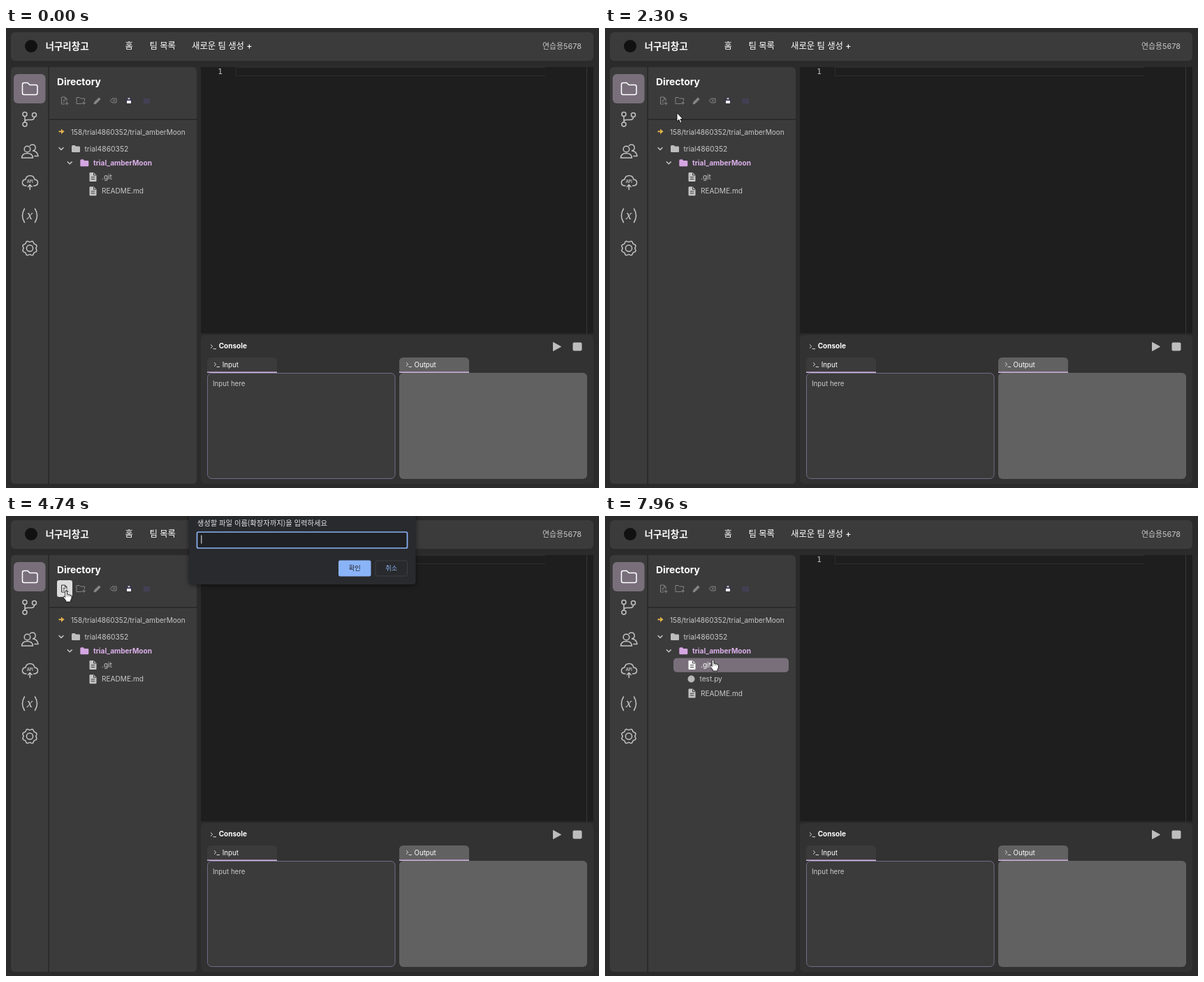
Recreate the animation shown at these times as an HTML page. Size 849 by 659 pixels, loop 8 s.

```html
<!DOCTYPE html>
<html lang="ko">
<head>
<meta charset="utf-8">
<style>
html, body { margin: 0; width: 100%; height: 100%; overflow: hidden; background: #2b2b2b; }
svg { display: block; width: 849px; height: 659px; font: 10.1px Inter, "Noto Sans CJK KR", "Noto Sans CJK", sans-serif; }
text { fill: #fff; white-space: pre; }
.nav { font-size: 12.4px; font-weight: 500; }
.tree text { fill: #c8c8c8; }
.tree .on text { fill: #fff; }
.tree .on use { color: #fff; }
.line { fill: none; stroke: #c4c4c4; stroke-width: 1.5; stroke-linecap: round; stroke-linejoin: round; }
.tool { fill: none; stroke: #858585; stroke-width: 1; stroke-linejoin: round; }
#dialog { font-family: "Noto Sans CJK KR", "Noto Sans CJK", sans-serif; filter: drop-shadow(0 1px 3px #0008); }
</style>
</head>
<body>
<svg viewBox="0 0 849 659">
  <defs>
    <path id="folder" fill="currentColor" d="M0 1.5Q0 0 1.5 0H4.5L6 1.6H10.7Q12 1.6 12 3V8.7Q12 10 10.7 10H1.3Q0 10 0 8.7Z"/>
    <g id="file">
      <path fill="currentColor" d="M0 1.2Q0 0 1.2 0H6L10 4V11.8Q10 13 8.8 13H1.2Q0 13 0 11.8Z"/>
      <path d="M6 .5V4H9.6M2.3 6.7H7.7M2.3 9.5H7.7" fill="none" stroke="#3b3b3b"/>
    </g>
    <path id="chevron" class="line" stroke-width="1.2" d="M-3-1.5 0 1.5 3-1.5"/>
    <path id="prompt" fill="none" stroke="#ddd" d="M0 0 2.7 2.6 0 5.2M3.6 6.2H8"/>
  </defs>

  <g fill="#3b3b3b">
    <rect x="7" y="6" width="834" height="41" rx="6"/>
    <path d="M13 56H60V653H13Q7 653 7 647V62Q7 56 13 56Z"/>
    <path d="M62 56H267Q273 56 273 62V130H62Z"/>
    <path d="M62 132H273V647Q273 653 267 653H62Z"/>
  </g>

  <circle cx="36" cy="26" r="9" fill="#111"/>
  <text x="56.5" y="30.5" font-size="13.5" font-weight="700">너구리창고</text>
  <g class="nav">
    <text x="170.5" y="30.3">홈</text>
    <text x="205.5" y="30.3">팀 목록</text>
    <text x="266" y="30.3">새로운 팀 생성 +</text>
  </g>
  <text x="824" y="30.3" font-size="10.9" text-anchor="end" style="fill:#c8c8c8">연습용5678</text>

  <!-- side bar -->
  <rect x="11" y="66" width="45.500" height="42" rx="6" fill="#796f7b"/>
  <g class="line">
    <path stroke="#fff" d="M23.500 81Q23.500 78.500 26 78.500H31L34 81.500H42.500Q45 81.500 45 84V93Q45 95.500 42.500 95.500H26Q23.500 95.500 23.500 93Z"/>
    <circle cx="27" cy="123.500" r="3"/><circle cx="27" cy="138" r="3"/><circle cx="40.500" cy="124.500" r="3"/>
    <path d="M27 126.500V135M40.500 127.500Q40.500 131.500 36 131.500H31Q27 131.500 27 134.500"/>
    <circle cx="30.500" cy="173.500" r="4.300"/>
    <path d="M22.500 186Q23 179.500 30.500 179.500T38.500 186ZM34.500 168.500A4.500 4.500 0 1 1 38.500 176Q45 176.500 46 183.500H41"/>
    <path d="M29 226H27.500Q23.500 225.500 23.500 221.500T28 217Q29 211.500 34.500 211.500T41 217Q45.500 217.500 45.500 221.500T41 226H39.500M34.300 231.500V225M31.500 227.500 34.300 224.500 37.100 227.500"/>
    <path d="M26.500 259Q20.500 268.500 26.500 278.500M41.500 259Q47.500 268.500 41.500 278.500"/>
    <circle cx="34" cy="315.500" r="4.600"/>
    <path id="gear"/>
  </g>
  <text x="34.300" y="222" text-anchor="middle" font-size="5.500" font-weight="700" style="fill:#c4c4c4">API</text>
  <text x="34" y="273.500" text-anchor="middle" font-size="17" font-style="italic" font-family="Noto Serif, serif" style="fill:#c4c4c4">x</text>

  <!-- directory -->
  <text x="73" y="82" font-size="13.800" font-weight="700">Directory</text>
  <rect id="newHover" x="73" y="92" width="22" height="24" rx="3" fill="#dcdcdc"/>
  <g class="tool">
    <path id="newIcon" d="M84 109H79.500V99H84.500L87 101.500V104.500M84.500 99V101.500H87M81.500 103.500H85M81.500 106H84M87 105.500V110.500M84.500 108H89.500"/>
    <path d="M109 108.500H101V99.500H105L106.500 101H112.500V104.500M111.500 105V110M109 107.500H114"/>
    <path fill="#858585" d="M126 109 126.800 106 133 99.800 135.200 102 129 108.200Z"/>
    <path d="M152 101H158V107H152L149.300 104ZM153 102.500 156 105.500M156 102.500 153 105.500"/>
  </g>
  <path d="M172 100H179L180 101V108H172Z" fill="#33334d"/>
  <path d="M174.500 100H177.500V102.500H174.500Z" fill="#b5b5c0"/>
  <path d="M173 104H179V108H173Z" fill="#eee"/>
  <path d="M196.500 101H206V108.500H196.500Z" fill="#434055"/>

  <g class="tree">
    <rect id="rowHover" rx="5"/>
    <path d="M75.500 147.200H79V144.500L83.500 148.200 79 152V149.200H75.500Z" fill="#e2b04a"/>
    <text x="93" y="153" font-size="10">158/trial4860352/trial_amberMoon</text>
    <use href="#chevron" x="79" y="173"/>
    <use href="#folder" x="94" y="168" color="#bdbdbd"/>
    <text x="112.500" y="176.700" font-size="10.300">trial4860352</text>
    <use href="#chevron" x="91.300" y="193.300"/>
    <use href="#folder" x="106.300" y="188.300" color="#d5a6e2"/>
    <text x="125" y="196.800" font-weight="700" style="fill:#dcb0ea">trial_amberMoon</text>
    <g id="git">
      <use href="#file" x="119.500" y="207" color="#c4c4c4"/>
      <text x="137" y="217">.git</text>
    </g>
    <g id="newFile">
      <circle cx="123.500" cy="233.500" r="5" fill="#b8b8b8"/>
      <text x="135.500" y="237.300">test.py</text>
    </g>
    <g id="readme">
      <use href="#file" x="119.500" y="227.300" color="#c4c4c4"/>
      <text x="137" y="237.300">README.md</text>
    </g>
  </g>

  <!-- editor -->
  <path d="M279 56H841V437.500H279Z" fill="#1e1e1e"/>
  <path d="M772 56.500H329.500V68.500H772" fill="none" stroke="#2d2d2d"/>
  <path d="M831.500 56V437.500" stroke="#383838"/>
  <text x="303.300" y="66" font-size="11" font-family="DejaVu Sans Mono, monospace" style="fill:#c6c6c6">1</text>

  <!-- console -->
  <rect x="279" y="440" width="562" height="213" rx="6" fill="#323232"/>
  <use href="#prompt" x="293" y="453.500"/>
  <text x="304.700" y="459.300" font-size="10" font-weight="700">Console</text>
  <path d="M783.500 450.500 794.500 456.500 783.500 462.500Z" fill="#bdbdbd" stroke="#bdbdbd" stroke-linejoin="round"/>
  <rect x="811.500" y="450.500" width="13" height="12" rx="2" fill="#bdbdbd"/>
  <path d="M288 494V478Q288 472 294 472H382Q388 472 388 478V494Z" fill="#3b3b3b"/>
  <path d="M563 494V478Q563 472 569 472H657Q663 472 663 478V494Z" fill="#616161"/>
  <rect x="288.500" y="494.500" width="268.500" height="151" rx="6" fill="#3b3b3b" stroke="#746b87"/>
  <rect x="563" y="494" width="269" height="152" rx="6" fill="#616161"/>
  <path d="M288 493.300H388M563 493.300H663" stroke="#cfb5e2" stroke-width="1.600"/>
  <use href="#prompt" x="298" y="479.300"/>
  <text x="309.700" y="485.500" font-size="9.700">Input</text>
  <use href="#prompt" x="573" y="479.300"/>
  <text x="584.500" y="485.500" font-size="9.700">Output</text>
  <text x="296" y="513" font-size="9.700" style="fill:#c8c8c8">Input here</text>

  <g id="dialog">
    <rect x="262" y="-8" width="324.500" height="107.500" rx="4" fill="#292a2d"/>
    <text x="273.800" y="15" font-size="10.300" style="fill:#e4e5e7">생성할 파일 이름(확장자까지)을 입력하세요</text>
    <rect x="273.500" y="24.500" width="301" height="23" rx="2" fill="#202124" stroke="#8ab4f8" stroke-width="1.700"/>
    <text id="typed" x="279.300" y="39" font-size="8.700" font-family="Open Sans, sans-serif"/>
    <rect id="caret" y="29" width="1" height="12" fill="#eee"/>
    <rect x="476" y="65" width="46.500" height="23" rx="2.500" fill="#8ab4f8"/>
    <text x="499.200" y="79.800" font-size="9.300" text-anchor="middle" style="fill:#202124">확인</text>
    <rect x="529" y="65.500" width="45.500" height="22" rx="2.500" fill="none" stroke="#3c4043"/>
    <text x="551.700" y="79.800" font-size="9.300" text-anchor="middle" style="fill:#8ab4f8">취소</text>
  </g>

  <g id="pointer" fill="#fff" stroke="#000" stroke-width=".8" stroke-linejoin="round">
    <path id="arrow" d="M0 0V12.300L2.900 9.700 5 14.700 7 13.800 4.900 9H8.600Z"/>
    <g id="hand">
      <path d="M-1.300 1Q0-.8 1.400 1V5.300Q2.800 4.500 3.800 5.900 5.200 5.200 6 6.500 7.700 6 8 7.800V11L6.500 14V16H-.2V14.300L-3.800 9.800Q-4.200 7.800-2.600 8.100L-1.300 9.500Z"/>
      <path d="M1.400 5.500V8.500M3.800 6V8.500M6 6.600V8.500" stroke-width=".5"/>
    </g>
  </g>
</svg>

<script>
const LOOP = 8000;
const $ = id => document.getElementById(id);

// Pointer moves: start, end, number of steps, x, y
const moves = [
  [80, 250, 3, 141, 247],
  [510, 870, 5, 140, 195],
  [1050, 1050, 1, 133, 182.5],
  [1140, 1230, 2, 128, 170],
  [1320, 1400, 2, 134, 190],
  [1580, 1750, 3, 860, 670],
  [2030, 2030, 1, 188, 225],
  [2120, 2300, 3, 103, 121.5],
  [2390, 2750, 5, 84, 105],
  [3020, 3020, 1, 190, 232],
  [3110, 3110, 1, 296.5, 236],
  [3200, 3290, 2, 328, 232],
  [3740, 4470, 9, 86, 107],
  [5000, 5180, 3, 168, 87],
  [7780, 7960, 3, 154.5, 206],
];

// Highlighted item from each time on
const hovers = [
  [0, ''], [510, 'readme'], [690, 'git'], [870, 'dir'], [1140, 'root'], [1320, 'dir'],
  [1580, ''], [2570, 'new'], [3020, 'readme'], [3200, ''], [3922, 'dir'], [4013, 'root'],
  [4104, ''], [4470, 'new'], [7780, ''], [7960, 'git'],
];
const rows = { root: [73, 163], dir: [86, 183], git: [98, 203.5], readme: [98, 223.7] };
const keyTimes = [5720, 5810, 5900, 6070, 6260, 6530, 6630];

const attrs = (el, o) => { for (const k in o) el.setAttribute(k, o[k]); };
const show = (id, on) => { $(id).style.display = on ? '' : 'none'; };

function pointerAt(t) {
  let x = 789, y = 680;
  for (const [a, b, n, tx, ty] of moves) {
    if (t < a) break;
    const k = Math.min(n, Math.floor((t - a + 3) * (n - 1) / (b - a || 1)) + 1) / n;
    x += (tx - x) * k;
    y += (ty - y) * k;
  }
  return [x, y];
}

function drawHover(item) {
  const row = rows[item];
  show('rowHover', row);
  if (row) {
    const [x, y] = row;
    const isFile = item === 'git' || item === 'readme';
    attrs($('rowHover'), { x, y, width: 263 - x, height: 20.3, fill: isFile ? '#796f7b' : '#394350' });
  }
  for (const id of ['git', 'readme']) attrs($(id), { class: item === id ? 'on' : '' });
  show('newHover', item === 'new');
  $('newIcon').style.stroke = item === 'new' ? '#333' : '';
}

function drawDialog(t) {
  const open = t >= 4650 && t < 7160;
  show('dialog', open);
  if (!open) return;
  const lift = t < 4740 ? -6 : t < 4830 ? -1.5 : 0;
  attrs($('dialog'), { transform: `translate(0 ${lift})`, opacity: t < 4740 ? .6 : t < 7070 ? 1 : .5 });
  const typed = $('typed');
  typed.textContent = 'test.py'.slice(0, keyTimes.filter(k => t >= k).length);
  attrs($('caret'), { x: 279.3 + typed.getComputedTextLength() });
  show('caret', t < 5090 || t >= 5720);
}

function draw(t) {
  const hover = hovers.findLast(([from]) => t >= from)[1];
  const [x, y] = pointerAt(t);
  const isHand = hover && x < 264;
  drawHover(hover);
  drawDialog(t);
  show('newFile', t >= 7250);
  attrs($('readme'), { transform: `translate(0 ${t >= 7250 ? 20.3 : 0})` });
  attrs($('pointer'), { transform: `translate(${x} ${y})` });
  show('hand', isHand);
  show('arrow', !isHand);
}

const rim = Array.from({ length: 64 }, (_, i) => {
  const a = i * Math.PI / 32, r = 9.8 - .9 * Math.cos(8 * a);
  return `${34 + r * Math.cos(a)} ${315.5 + r * Math.sin(a)}`;
});
attrs($('gear'), { d: `M${rim.join('L')}Z` });

const start = performance.now();
(function tick() {
  draw((performance.now() - start) % LOOP);
  requestAnimationFrame(tick);
})();
</script>
</body>
</html>
```
